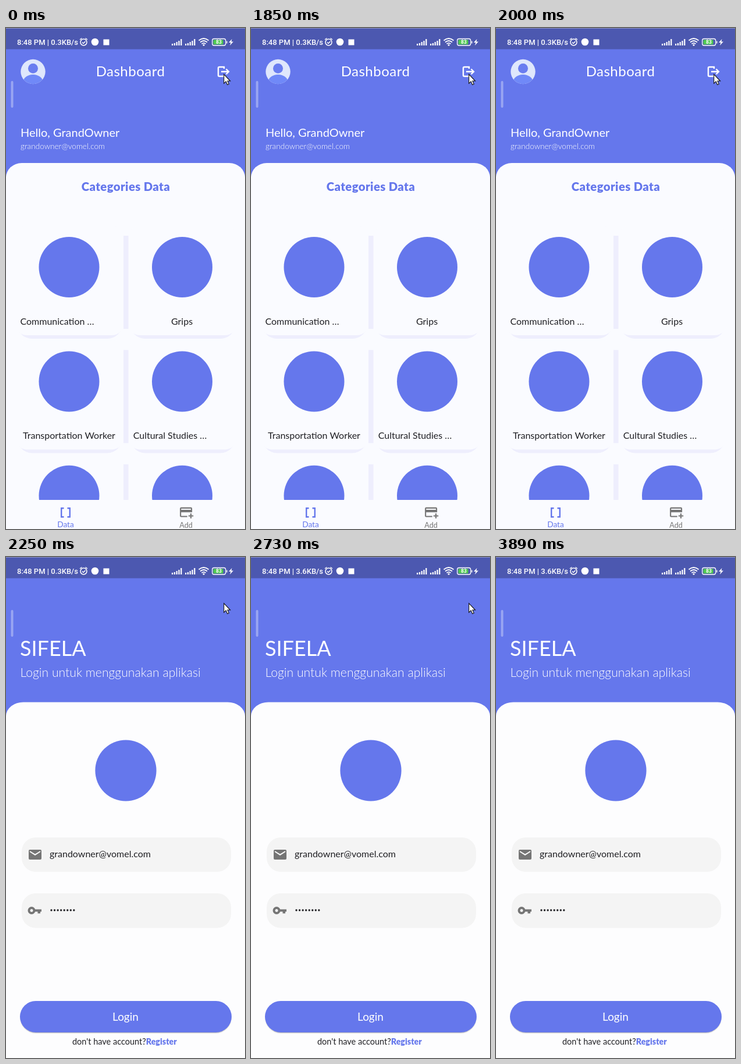
An HTML page that plays this animation: 411 by 861 pixels, repeating every 4.92 s.

```html
<!DOCTYPE html>
<html lang="en">
<head>
<meta charset="utf-8">
<title>Logout flow</title>
<style>
  html, body { margin: 0; width: 100%; height: 100%; overflow: hidden; background: #fafbff; }
  svg { display: block; width: 100vw; height: 100vh; }
  text { font-family: Lato, "Open Sans", sans-serif; white-space: pre; }
  .status { font: 500 13px Roboto, sans-serif; }
  .blue { fill: #6577ec; }
  .white { fill: #fff; }
  .ink { fill: #202024; }
  .grey { fill: #757575; }
  .light { font-weight: 300; }
  .black { font-weight: 900; }
  .wide { letter-spacing: .02em; }
  .mid { text-anchor: middle; }
  .line { fill: none; stroke: #fff; }
</style>
</head>
<body>
<svg viewBox="0 0 411 861" preserveAspectRatio="none">
  <rect class="blue" width="411" height="300"/>
  <rect width="411" height="36.500" fill="#4c58b0"/>
  <rect width="411" height="1" fill="#8f94c4"/>

  <g id="dashboard">
    <clipPath id="face"><circle cx="46.5" cy="75" r="21.2"/></clipPath>
    <g clip-path="url(#face)">
      <rect x="25" y="53" width="43" height="44" fill="#dfe7fc"/>
      <ellipse cx="46.5" cy="93" rx="17" ry="13" fill="#7089f8"/>
      <circle cx="46.5" cy="70" r="10" fill="#dfe7fc"/>
      <circle cx="46.5" cy="69.5" r="8.5" fill="#6a7df0"/>
    </g>
    <text class="white mid wide" x="214" y="83" font-size="24">Dashboard</text>
    <path class="line" stroke-width="2.4" d="M375 70V67H367Q365 67 365 69V81Q365 83 367 83H375V80M370 75H382M378.500 70.500L383 75L378.500 79.500"/>
    <text class="white" x="25" y="187" font-size="20">Hello, GrandOwner</text>
    <text class="white light" x="25" y="208" font-size="13.600">grandowner@vomel.com</text>
    <rect y="232" width="411" height="700" rx="27" ry="25" fill="#fafbff"/>
    <text class="blue black mid wide" x="206" y="280" font-size="20.300">Categories Data</text>
    <g id="cards"></g>
    <rect y="811" width="411" height="50" fill="#fafbff"/>
    <path class="line" style="stroke:#6577ec" stroke-width="2.4" d="M99.500 825.200H95.200V840.300H99.500M105.500 825.200H109.800V840.300H105.500"/>
    <text class="blue mid" x="102.500" y="858" font-size="13.700">Data</text>
    <path class="grey" transform="translate(297 819.600) scale(1.05)" d="M20 4H4Q2 4 2 6V18Q2 20 4 20H14V18H4V12H22V6Q22 4 20 4ZM20 8H4V6H20ZM24 17V19H21V22H19V19H16V17H19V14H21V17Z"/>
    <text class="grey mid" x="309.500" y="859" font-size="12.600">Add</text>
  </g>

  <g id="login">
    <text class="white" x="24" y="170" font-size="36">SIFELA</text>
    <text class="white light" x="24.500" y="206" font-size="21.200">Login untuk menggunakan aplikasi</text>
    <rect y="249.500" width="411" height="700" rx="30" ry="24" fill="#fdfdfe"/>
    <circle class="blue" cx="206" cy="367" r="52.600"/>
    <g id="fields" fill="#f4f4f4">
      <rect x="27" y="482" width="360" height="59" rx="24"/>
      <rect x="27" y="578" width="360" height="59.500" rx="24"/>
    </g>
    <rect class="grey" x="39" y="503" width="22" height="17" rx="2"/>
    <path class="line" style="stroke:#f8f8f8" stroke-width="2" d="M41 506L50 511.700L59 506"/>
    <text class="ink" x="75" y="516" font-size="16">grandowner@vomel.com</text>
    <circle class="line" style="stroke:#757575" stroke-width="4" cx="44" cy="607.500" r="4.500"/>
    <path class="grey" d="M48 605.500H61V609.500H59V612.500H54.500V609.500H48Z"/>
    <g id="dots" class="ink"></g>
    <g id="footer">
      <rect x="24" y="765" width="364" height="54" rx="27" fill="#000" opacity=".08"/>
      <rect x="24.500" y="764" width="363" height="54" rx="27" fill="#000" opacity=".18"/>
      <rect class="blue" x="24" y="763" width="364" height="54" rx="27"/>
      <text class="white mid" x="205.500" y="797" font-size="19">Login</text>
      <text class="ink" x="114" y="838" font-size="14.500">don't have account?<tspan class="blue black" font-size="14.300">Register</tspan></text>
    </g>
  </g>

  <text id="speed" class="status white" x="19" y="29"></text>
  <g class="line" stroke-width="1.500">
    <circle cx="133.500" cy="24.500" r="5.500"/>
    <path d="M127 20L130.500 17.500M140 20L136.500 17.500M131 24.500L133 26.500L136.500 23"/>
    <path stroke-width="1.700" d="M331.500 21.500Q340 14.500 348.500 21.500M334 24.500Q340 19.500 346 24.500M336.500 27.300Q340 24.500 343.500 27.300"/>
    <rect x="354.700" y="18.500" width="23" height="11.500" rx="3" stroke-width="1.300"/>
    <path d="M379.700 22.500V26.500"/>
  </g>
  <circle class="white" cx="153" cy="24" r="6.300"/>
  <rect class="white" x="167.500" y="19.500" width="10" height="10"/>
  <g id="bars" class="white"></g>
  <circle class="white" cx="340" cy="29.300" r="1.500"/>
  <rect x="356.500" y="20.200" width="17" height="8" rx="1.500" fill="#4fc950"/>
  <text class="status white mid" x="366" y="27.300" style="font-size:8.500px;font-weight:700">83</text>
  <path class="white" d="M388.500 19L383 25H386.500L385 30L391 23.500H387.500Z"/>
  <rect x="8.500" y="91" width="4" height="46" rx="2" fill="#fff" opacity=".35"/>
  <path id="cursor" class="white" stroke="#111" stroke-width="1.100" d="M374.700 79.700V95.200L378.300 91.900L380.700 97.500L383.300 96.400L381 91H385.600Z"/>
</svg>
<script>
const LOOP = 4920, LOGIN = 2130, SETTLED = 2250, SPEED = 2610, CURSOR_OFF = 3890;
const el = id => document.getElementById(id);
const show = (id, on) => el(id).setAttribute("visibility", on ? "visible" : "hidden");

const labels = [
  [["Communication …", 88], ["Grips", 302.5]],
  [["Transportation Worker", 108.5], ["Cultural Studies …", 282]],
  [["", 0], ["", 0]]
];

function card(x, y, [label, center]) {
  return `<rect x="${x + 4}" y="${y + 20}" width="181" height="174" rx="26" fill="#eeeefd"/>
    <rect x="${x}" y="${y}" width="188" height="188" rx="21" fill="#fafbff"/>
    <circle class="blue" cx="${x + 93.5}" cy="${y + 71}" r="52"/>
    <text class="ink mid" x="${center}" y="${y + 170}" font-size="16">${label}</text>`;
}

el("cards").innerHTML = labels.map((row, i) => {
  const y = 340 + i * 196.4;
  return card(15, y, row[0]) + card(209.5, y, row[1]) +
    `<rect x="202" y="${y + 17}" width="8.500" height="160" fill="#eeeefd"/>`;
}).join("");

el("dots").innerHTML = Array.from({ length: 8 }, (_, i) =>
  `<circle cx="${78 + i * 5.55}" cy="607" r="1.700"/>`).join("");

el("bars").innerHTML = [285, 308].map(x => [3, 4, 6, 8, 11].map((h, i) =>
  `<rect x="${x + i * 3.8}" y="${30 - h}" width="2.200" height="${h}"/>`).join("")).join("");

function draw() {
  const t = performance.now() % LOOP;
  const onLogin = t >= LOGIN, settled = t >= SETTLED;
  show("dashboard", !onLogin);
  show("login", onLogin);
  show("fields", settled);
  show("cursor", t < CURSOR_OFF);
  el("footer").setAttribute("transform", `translate(0 ${settled ? 0 : -1})`);
  el("speed").textContent = `8:48 PM | ${t < SPEED ? "0.3" : "3.6"}KB/s`;
  requestAnimationFrame(draw);
}
draw();
</script>
</body>
</html>
```
